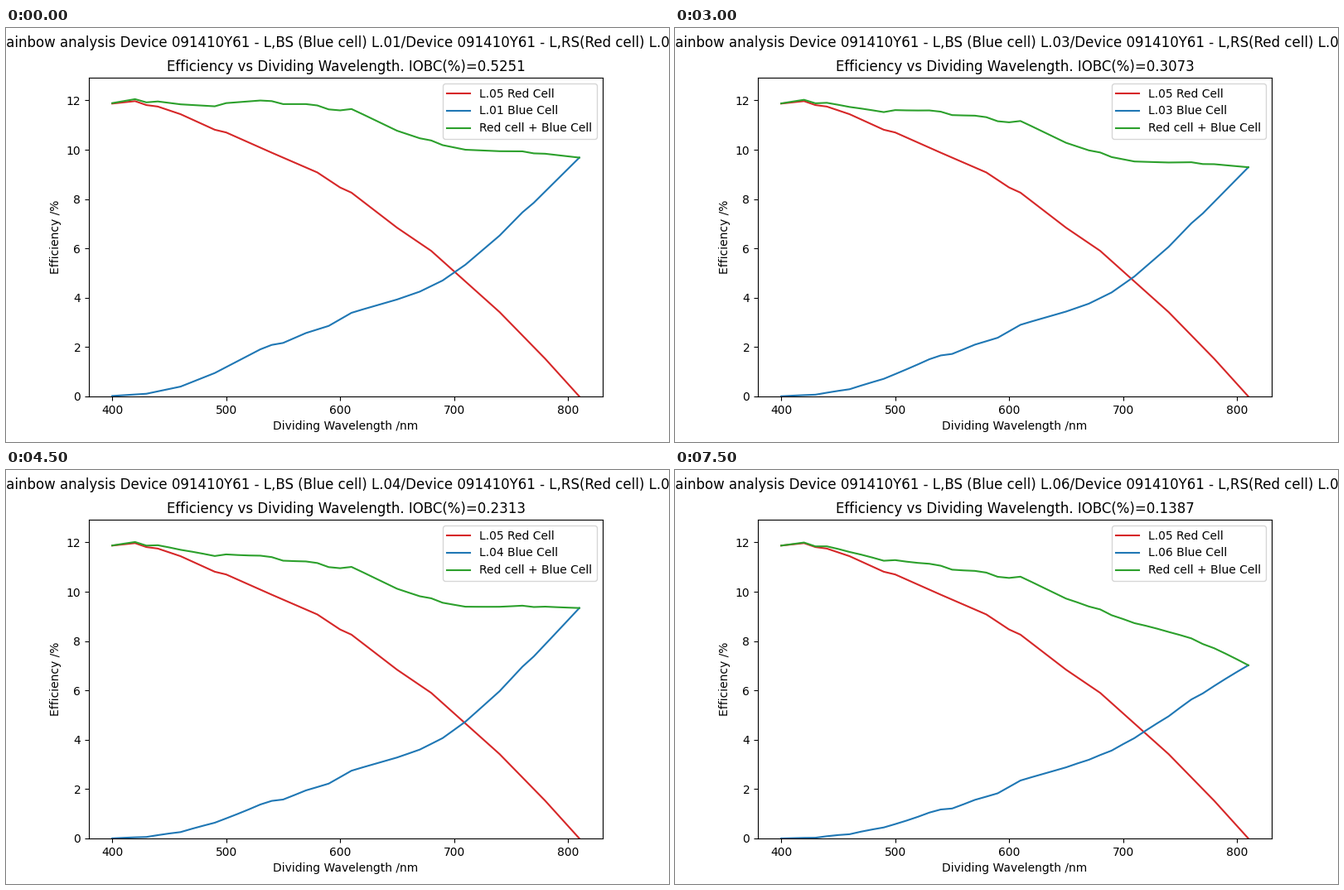
A matplotlib script that plays this animation: 800 by 500 pixels, repeating every 8 s.

```python
import numpy as np
import matplotlib.pyplot as plt
from matplotlib.animation import FuncAnimation

STEP_MS = 500
HOLD = 3          # steps each cell stays on screen
STEPS = 16

wavelength = np.arange(400, 811, 10)


def through(*points):
    """Straight segments through a few (wavelength, efficiency) points."""
    return np.interp(wavelength, *zip(*points))


red = through((400, 11.87), (420, 11.97), (430, 11.81), (440, 11.75),
              (460, 11.44), (490, 10.81), (500, 10.70), (540, 9.88),
              (580, 9.08), (600, 8.47), (610, 8.26), (650, 6.84),
              (680, 5.90), (740, 3.42), (780, 1.53), (810, 0))

best_blue = through((400, 0.02), (430, 0.11), (460, 0.40), (490, 0.95),
                    (530, 1.91), (540, 2.09), (550, 2.17), (570, 2.57),
                    (590, 2.86), (610, 3.39), (620, 3.53), (650, 3.93),
                    (670, 4.25), (690, 4.70), (710, 5.34), (740, 6.52),
                    (760, 7.46), (770, 7.85), (810, 9.68))

# Each cell: IOBC, loss on the plateau, extra loss at the red end
cells = [
    (0.5251, 0, 0),
    (0.5051, 0.18, -0.02),
    (0.3073, 0.49, -0.10),
    (0.2313, 0.65, -0.31),
    (0.2067, 0.73, -0.38),
    (0.1387, 1.05, 1.61),
]
plateau = 1 / (1 + np.exp((492 - wavelength) / 25))
red_end = np.clip((wavelength - 660) / 150, 0, 1) ** 1.8


def blue_curve(k):
    _, level, tail = cells[k]
    return np.maximum(best_blue - level * plateau - tail * red_end, 0)


fig, ax = plt.subplots(figsize=(8, 5), dpi=100)
heading = fig.suptitle("", y=0.982)
title = ax.set_title("")
ax.set_xlabel("Dividing Wavelength /nm")
ax.set_ylabel("Efficiency /%")
ax.set_xlim(379.5, 830.5)
ax.set_ylim(0, 12.92)

ax.plot(wavelength, red, color="tab:red", label="L.05 Red Cell")
blue_line, = ax.plot(wavelength, best_blue, color="tab:blue",
                     label="L.01 Blue Cell")
sum_line, = ax.plot(wavelength, red + best_blue, color="tab:green",
                    label="Red cell + Blue Cell")
legend = ax.legend(loc="upper right")


def update(step):
    k = step // HOLD
    cell = f"L.{k + 1:02d}"
    blue = blue_curve(k)
    blue_line.set_ydata(blue)
    sum_line.set_ydata(red + blue)
    legend.get_texts()[1].set_text(f"{cell} Blue Cell")
    title.set_text("Efficiency vs Dividing Wavelength. "
                   f"IOBC(%)={cells[k][0]:.4f}")
    heading.set_text(f"Rainbow analysis Device 091410Y61 - L,BS (Blue cell) {cell}"
                     "/Device 091410Y61 - L,RS(Red cell) L.05")
    return blue_line, sum_line, title, heading


anim = FuncAnimation(fig, update, frames=STEPS, interval=STEP_MS,
                     init_func=lambda: update(0), repeat=True, repeat_delay=0)
plt.show()
```
